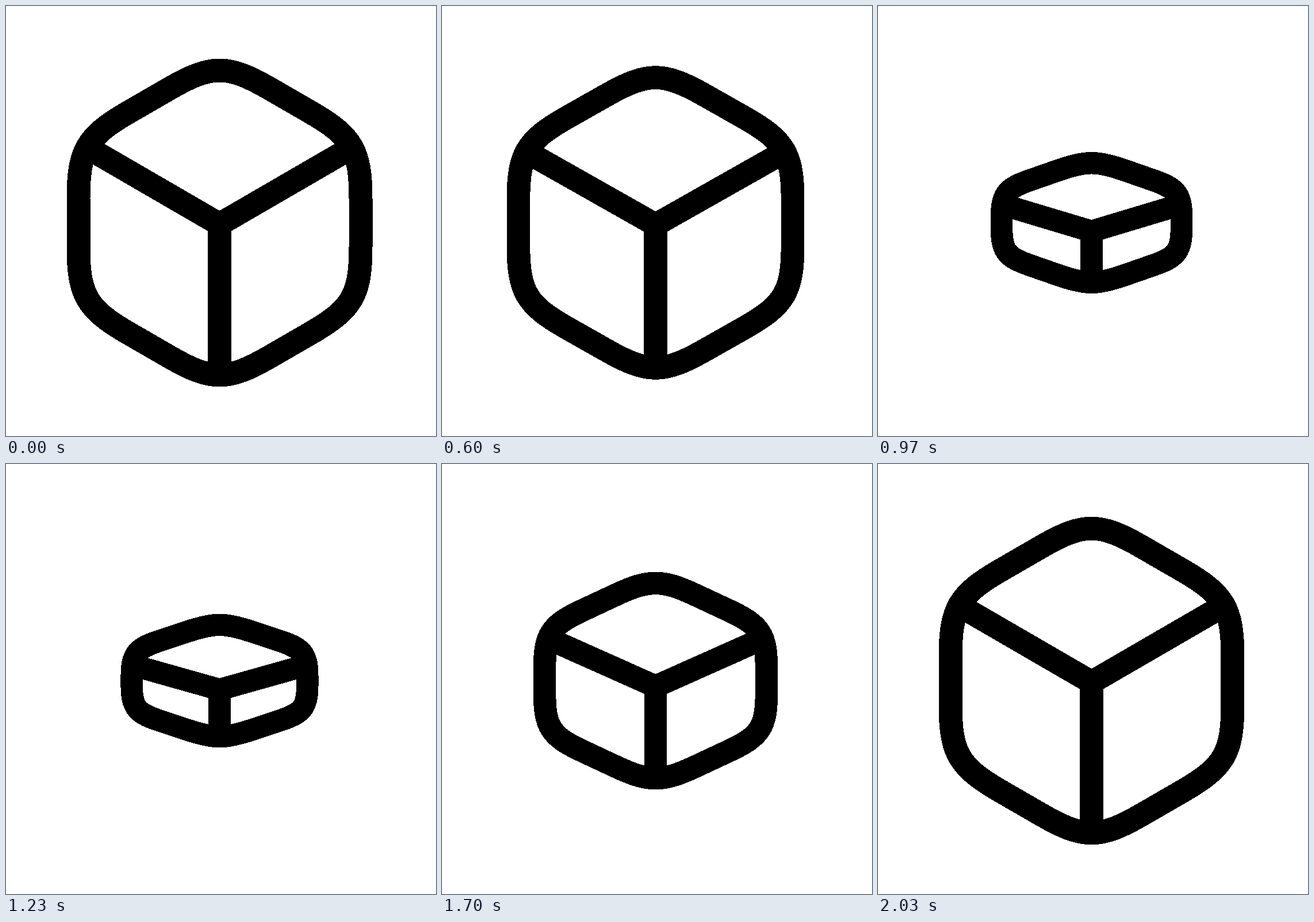
These frames come from a looping animation (748x748 px, 2.13 s). An HTML page:

```html
<!DOCTYPE html>
<html lang="en">
<head>
<meta charset="utf-8">
<title>Box</title>
<style>
  html, body { margin: 0; width: 100%; height: 100%; overflow: hidden; background: #fff; }
  svg { display: block; width: 100%; height: 100%; }
  path { fill: none; stroke: #000; stroke-miterlimit: 10; shape-rendering: crispEdges; }
</style>
</head>
<body>
<svg viewBox="0 0 748 748">
  <path id="shell"/>
  <path id="ribs"/>
</svg>
<script>
  const CX = 371.5, CY = 377;
  const LOOP = 2130, FPS = 30;
  const TURN = 36.42, SPAN = 25.7; // frames
  const DEPTH = 1.035;
  const GRIP = 0.165; // how far the corner handles stay from the corner

  // Half width, side corner, apex, corner cuts, rib end, hub, rib foot, line weight
  const tall = { w: 245.5, side: 141.8, apex: 283.7, cutSide: 100, cutApex: 100,
                 ribX: 231.5, ribY: -131.6, hub: 2.7, foot: 265, line: 41 };
  const flat = { w: 156, side: 56.2, apex: 110.1, cutSide: 50, cutApex: 60,
                 ribX: 147, ribY: -28.6, hub: 15.1, foot: 102.75, line: 38.5 };

  const shell = document.getElementById('shell');
  const ribs = document.getElementById('ribs');

  const mix = (a, b, p) => a + (b - a) * p;
  const pt = ([x, y]) => (CX + x).toFixed(2) + ' ' + (CY + y).toFixed(2);

  // cubic-bezier(.8, 0, 0, 1)
  function ease(x) {
    if (x <= 0) return 0;
    if (x >= 1) return 1;
    let lo = 0, hi = 1;
    for (let i = 0; i < 30; i++) {
      const s = (lo + hi) / 2;
      if (2.4 * s * (1 - s) ** 2 + s ** 3 < x) lo = s; else hi = s;
    }
    return lo * lo * (3 - 2 * lo);
  }

  function toward(from, to, dist) {
    const dx = to[0] - from[0], dy = to[1] - from[1];
    const k = dist / Math.hypot(dx, dy);
    return [from[0] + dx * k, from[1] + dy * k];
  }

  function roundedPath(points, cuts) {
    const n = points.length;
    return points.map((v, i) => {
      const prev = points[(i + n - 1) % n], next = points[(i + 1) % n];
      const cut = cuts[i], grip = cut * GRIP;
      const curve = [toward(v, prev, grip), toward(v, next, grip), toward(v, next, cut)];
      return (i ? 'L' : 'M') + pt(toward(v, prev, cut)) + 'C' + curve.map(pt).join(' ');
    }).join('') + 'Z';
  }

  function draw(p) {
    const g = {};
    for (const k in tall) g[k] = mix(tall[k], flat[k], p);
    const { w, side, apex, cutSide: s, cutApex: a } = g;
    shell.setAttribute('d', roundedPath(
      [[0, -apex], [w, -side], [w, side], [0, apex], [-w, side], [-w, -side]],
      [a, s, s, a, s, s]));
    const hub = pt([0, g.hub]);
    ribs.setAttribute('d',
      `M${pt([-g.ribX, g.ribY])}L${hub}L${pt([g.ribX, g.ribY])}` +
      `M${hub}L${pt([0, g.foot])}`);
    shell.style.strokeWidth = ribs.style.strokeWidth = g.line;
  }

  function tick() {
    const t = performance.now() % LOOP;
    const frame = Math.floor((Math.floor(t / 10) + 0.5) * FPS / 100);
    draw(DEPTH * ease(1 - Math.abs(frame - TURN) / SPAN));
    requestAnimationFrame(tick);
  }
  tick();
</script>
</body>
</html>
```
